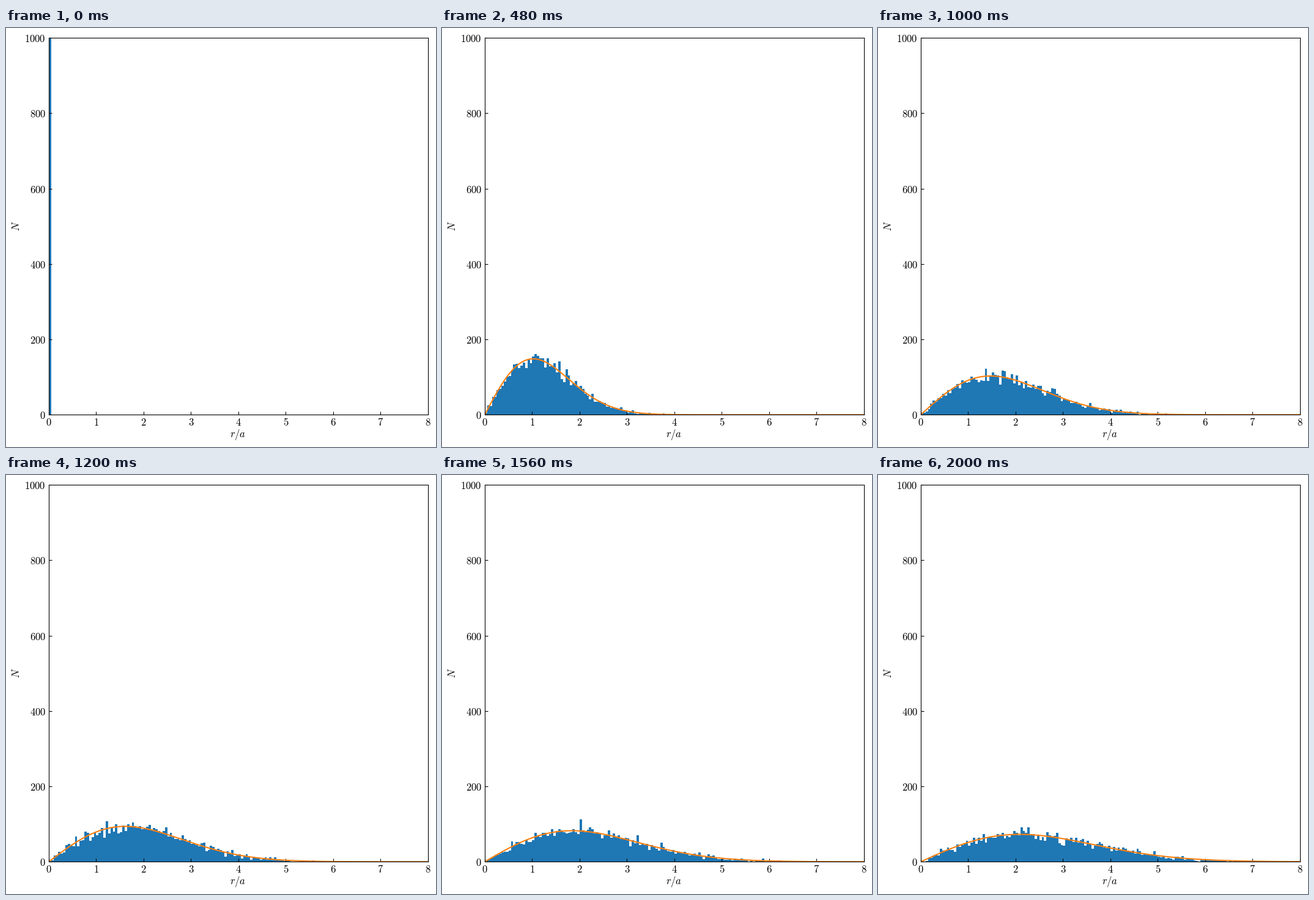
These frames come from a looping animation (703x685 px, 2.04 s). A matplotlib script:

```python
import matplotlib.pyplot as plt
import numpy as np
from matplotlib.animation import FuncAnimation

WIDTH, HEIGHT, DPI = 703, 685, 100
FRAMES, INTERVAL = 51, 40
WALKERS = 5000
BIN = 0.05
R_MAX, N_MAX = 8, 1000
STEP_VAR = 0.087  # variance gained per axis and frame

plt.rcParams.update({
    "font.size": 12,
    "mathtext.fontset": "cm",
    "xtick.direction": "in",
    "ytick.direction": "in",
    "xtick.major.pad": 2.5,
})

# Random walk in the plane, all walkers starting at the origin
rng = np.random.default_rng(7)
steps = rng.normal(0, np.sqrt(STEP_VAR), (FRAMES, WALKERS, 2))
steps[0] = 0
radii = np.hypot(*np.moveaxis(steps.cumsum(axis=0), -1, 0))

edges = np.linspace(0, R_MAX, round(R_MAX / BIN) + 1)
r = np.linspace(0, R_MAX, 400)


def rayleigh(var):
    return WALKERS * BIN * r / var * np.exp(-r**2 / (2 * var))


fig = plt.figure(figsize=(WIDTH / DPI, HEIGHT / DPI), dpi=DPI, facecolor="white")
ax = fig.add_axes([69.9 / WIDTH, 52.75 / HEIGHT, 620 / WIDTH, 616 / HEIGHT])

bars = ax.stairs(np.zeros(len(edges) - 1), edges, fill=True, color="C0")
curve, = ax.plot([], [], color="C1", lw=1.5)

ax.set_xlim(0, R_MAX)
ax.set_ylim(0, N_MAX)
xticks, yticks = range(R_MAX + 1), range(0, N_MAX + 1, 200)
ax.set_xticks(xticks, [f"${v}$" for v in xticks])
ax.set_yticks(yticks, [f"${v}$" for v in yticks])

fig.text(379.2 / WIDTH, 16 / HEIGHT, "$r/a$", ha="center", va="baseline")
fig.text(22 / WIDTH, 361 / HEIGHT, "$N$", rotation=90, rotation_mode="anchor",
         ha="center", va="baseline")


def update(i):
    counts, _ = np.histogram(radii[i], edges)
    bars.set_data(values=counts)
    if i:
        curve.set_data(r, rayleigh(STEP_VAR * i))
    else:
        curve.set_data([], [])
    return bars, curve


anim = FuncAnimation(fig, update, frames=FRAMES, interval=INTERVAL,
                     repeat=True, repeat_delay=0)
plt.show()
```
